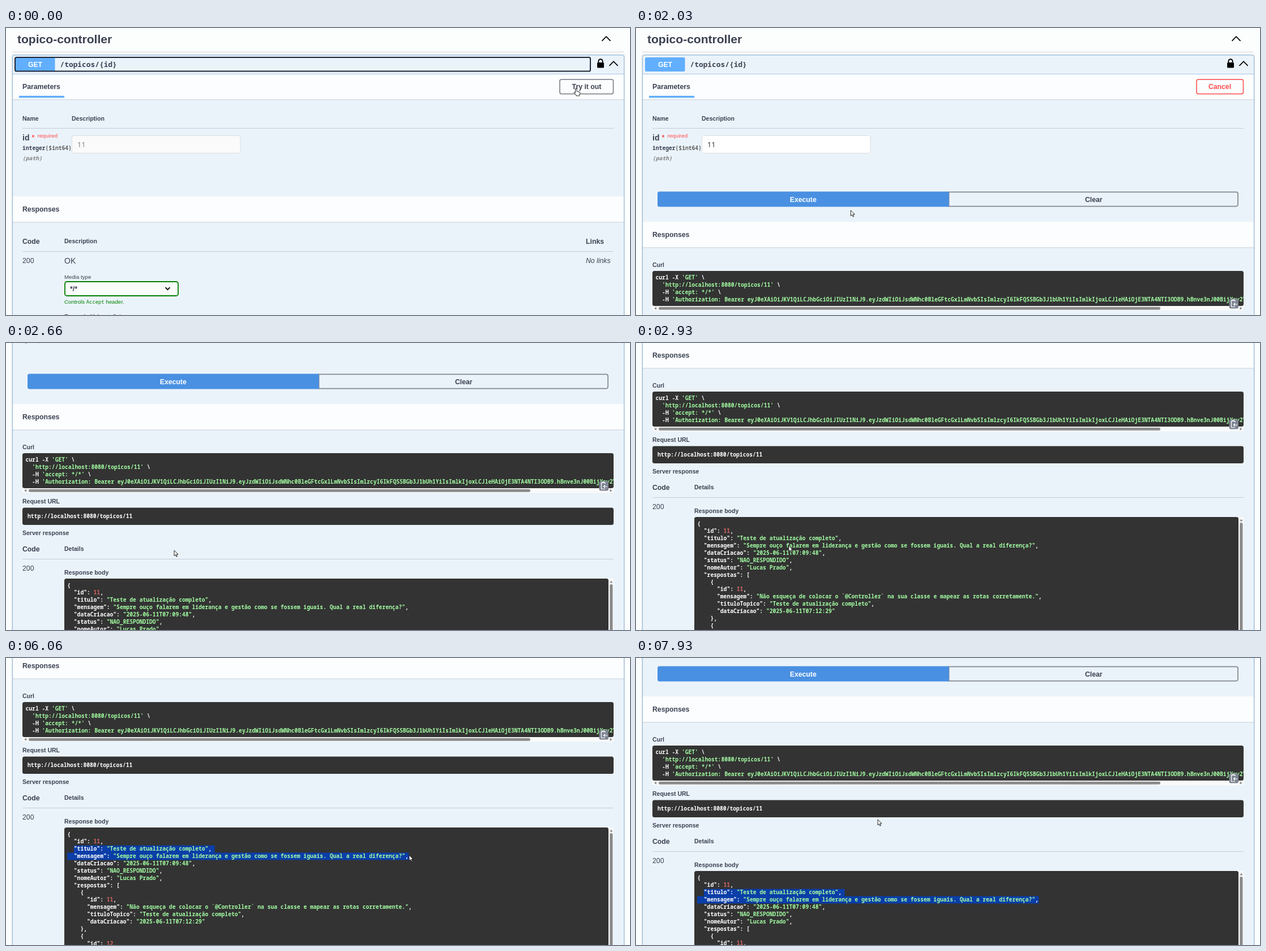
These frames come from a looping animation (1102x508 px, 8 s). An HTML page:

```html
<!DOCTYPE html>
<html lang="en">
<head>
<meta charset="utf-8">
<title>API explorer</title>
<style>
  html, body { margin: 0; width: 100%; height: 100%; overflow: hidden; background: #fcfdfd; }
  svg { display: block; }
  text { font-family: 'Liberation Sans', Arial, sans-serif; font-size: 12.28px; fill: #3b4151; }
  .b { font-weight: 700; }
  .i { font-style: italic; }
  .sm { font-size: 10.53px; }
  .xs { font-size: 9.7px; }
  .lg { font-size: 14.04px; }
  .title { font-size: 21.05px; }
  .mid { text-anchor: middle; }
  .mono { font-family: 'Noto Sans Mono', 'DejaVu Sans Mono', monospace; font-size: 9.66px; font-weight: 700; }
  .path { font-size: 12.87px; }
  .value { font-family: 'Open Sans', 'Noto Sans', sans-serif; font-size: 12.6px; }
  .w { fill: #fff; }
  .str { fill: #a2fca2; }
  .num { fill: #d36363; }
  .green { fill: #008000; }
  .red { fill: #ff4d4d; }
  .gray { fill: #808080; }
  .rule { fill: #c3ccd6; }
  .band { fill: #fbfdfe; }
  .dark { fill: #333; }
  .thumb { fill: #8b8b8b; }
  .outline { fill: none; stroke: #858990; stroke-width: 1.75; }
  .stroke { fill: none; stroke: #000; stroke-width: 1.8; }
</style>
</head>
<body>
<svg id="stage" width="1102" height="508" viewBox="0 0 1102 508"></svg>
<script>
const CHAR = 5.8, LINE = 12.87, LOOP = 8000;

const text = (x, y, s, cls = '') => `<text x="${x}" y="${y}" class="${cls}">${s}</text>`;
const rect = (x, y, w, h, cls = '', more = '') =>
  `<rect x="${x}" y="${y}" width="${w}" height="${h}" class="${cls}" ${more}/>`;
const rule = y => rect(29, y, 1044, 1, 'rule');
const band = (y, h) => rect(12, y + h, 1079, 1.5, '', 'fill="#d5dee6"') + rect(12, y, 1079, h, 'band');
const chevron = (x, y, w, h) => `<path class="stroke" d="M${x - w} ${y + h}L${x} ${y - h}L${x + w} ${y + h}"/>`;
const group = (id, body) => `<g id="${id}">${body}</g>`;

// Code block: indentation becomes an x offset, tokens become coloured spans
function code(x, y, lines, tint) {
  return lines.map((line, i) => {
    const body = line.trimStart();
    const indent = line.length - body.length;
    return text((x + indent * CHAR).toFixed(1), (y + i * LINE).toFixed(2), tint(body), 'mono w');
  }).join('');
}
const span = (cls, s) => `<tspan class="${cls}">${s}</tspan>`;
const tintShell = s => s.replace(/'[^']*'?/g, m => span('str', m));
const tintJson = s => s.replace(/"[^"]*":|"[^"]*"|\d+/g, m =>
  m.endsWith(':') ? m : span(m[0] === '"' ? 'str' : 'num', m));

const curl = [
  "curl -X 'GET' \\",
  "  'http://localhost:8080/topicos/11' \\",
  "  -H 'accept: */*' \\",
  "  -H 'Authorization: Bearer eyJ0eXAiOiJKV1QiLCJhbGciOiJIUzI1NiJ9.eyJzdWIiOiJsdWNhc0BleGFtcGxlLmNvbSIsImlzcyI6IkFQSSBGb3J1bUh1YiIsImlkIjoxLCJleHAiOjE3NTA4NTI3ODB9.hBnve3nJ00BijYpy2YkQ"
];
const json = [
  '{',
  '  "id": 11,',
  '  "titulo": "Teste de atualização completo",',
  '  "mensagem": "Sempre ouço falarem em liderança e gestão como se fossem iguais. Qual a real diferença?",',
  '  "dataCriacao": "2025-06-11T07:09:48",',
  '  "status": "NAO_RESPONDIDO",',
  '  "nomeAutor": "Lucas Prado",',
  '  "respostas": [',
  '    {',
  '      "id": 11,',
  '      "mensagem": "Não esqueça de colocar o `@Controller` na sua classe e mapear as rotas corretamente.",',
  '      "tituloTopico": "Teste de atualização completo",',
  '      "dataCriacao": "2025-06-11T07:12:29"',
  '    },',
  '    {',
  '      "id": 12,',
  '      "mensagem": "'
];

const header =
  text(20, 27, 'topico-controller', 'b title') + chevron(1060, 19, 7.5, 3.8) +
  rect(11, 42, 1080, 1, '', 'fill="#d3d6db"') +
  rect(11, 47.5, 1081, 2000, '', 'rx="3.5" fill="none" stroke="#000" stroke-opacity=".08" stroke-width="3"') +
  rect(11.5, 48, 1080, 2000, '', 'rx="3.5" fill="#ebf3fa" stroke="#8fb8de"') +
  rect(12, 81, 1079, 1, '', 'fill="#a6c9ea"') +
  rect(16, 52, 70.5, 25, '', 'rx="2.6" fill="#61affe"') +
  text(51.5, 68.5, 'GET', 'b mid w') + text(95.5, 69, '/topicos/{id}', 'mono path') +
  rect(1044, 61, 12, 9.5, '', 'rx="1.5"') +
  '<path d="M1046.4 62V58.8a3.6 3.6 0 0 1 7.2 0V62" fill="none" stroke="#000" stroke-width="1.9"/>' +
  chevron(1073, 63, 7.5, 3.8);

const params =
  band(82, 44) + text(29, 108, 'Parameters', 'b') + rect(23, 120, 80, 3.5, '', 'fill="#61affe"') +
  text(29, 163.5, 'Name', 'b sm') + text(116, 163.5, 'Description', 'b sm') + rule(177) +
  text(29, 199, 'id', 'b lg') + text(45.5, 198, '*', 'b red') + text(55.5, 194, 'required', 'xs red') +
  text(29, 216.3, 'integer<tspan fill="#606060">($int64)</tspan>', 'mono') +
  text(29, 234, '(path)', 'mono i gray') +
  '<rect id="field" x="116.5" y="190.5" width="297.5" height="31" rx="3.5" stroke="#d9dde1"/>' +
  '<text id="value" x="126" y="210.8" class="value">11</text>';

const defaults =
  text(29, 426.5, 'Code', 'b') + text(103, 426, 'Description', 'b sm') + text(1024, 426.5, 'Links', 'b') + rule(440) +
  text(29, 461, '200') + text(103, 462, 'OK', 'lg') + text(1024, 461, 'No links', 'i') +
  text(103, 488.7, 'Media type', 'xs') +
  rect(104, 494, 200, 25, '', 'rx="3.5" fill="#fbfcfc" stroke="#008000" stroke-width="1.8"') +
  text(113, 511, '*/*', 'b') +
  '<path class="stroke" d="M281.5 504.2L285.5 508.2L289.5 504.2"/>' +
  text(103, 532.5, 'Controls <tspan class="mono green" style="font-size:8.85px;font-weight:400">Accept</tspan> header.', 'xs green') +
  text(103, 559.5, 'Example Value', 'b sm') + rect(181.5, 551, 1, 12, 'rule') + text(188, 559.5, 'Schema', 'sm');

// Laid out as seen at full scroll, then pushed down the page
const result = `<g transform="translate(0 352)">` +
  text(29, 70.7, 'Curl', 'b sm') +
  rect(29, 136, 1044, 12, '', 'fill="#fafafa" rx="3.5"') + rect(29, 78, 1044, 62, 'dark', 'rx="3.5"') +
  rect(40, 141.7, 886, 5, 'thumb', 'rx="2.5"') +
  '<path class="thumb" d="M32 144.2l4-2.6v5.2zM1070.500 144.200l-4-2.600v5.200z"/>' +
  `<svg x="0" y="0" width="1073" height="400">${code(34.5, 93, curl, tintShell)}</svg>` +
  rect(1047.5, 127.500, 16.500, 17, '', 'rx="3" fill="#7d8492"') +
  '<path d="M1058 132v-1.500h-6.500v11h6.500M1053 130v-1h3.500v1M1062 137h-6M1058 134.500l-2.500 2.500l2.500 2.500" fill="none" stroke="#fff" stroke-width="1.200"/>' +
  text(29, 166.7, 'Request URL', 'b sm') + rect(29, 174.5, 1044, 30.5, 'dark', 'rx="3.5"') +
  text(38, 193.2, 'http://localhost:8080/topicos/11', 'mono w') +
  text(29, 223, 'Server response', 'b sm') +
  text(29, 251.7, 'Code', 'b') + text(103, 251, 'Details', 'b sm') + rule(265) +
  text(29, 286, '200') + text(103, 292.7, 'Response body', 'b sm') +
  rect(1060, 300, 13, 600, '', 'fill="#fafafa"') + rect(103, 300, 961, 600, 'dark', 'rx="3.5"') +
  '<path class="thumb" d="M1069 303.500l2.600 4h-5.200z"/>' + rect(1066.3, 310, 5.2, 500, 'thumb', 'rx="2.600"') +
  '<path id="selection" fill="#0b3ea8"/>' + code(108.2, 315.6, json, tintJson) + '</g>';

const cursors =
  group('arrow', '<path d="M0 0V9.800L2.300 7.700L3.900 11.300L5.500 10.600L3.900 7.100H7Z" fill="#fff" stroke="#111" stroke-width=".9"/>') +
  group('beam', '<path d="M-2-5h1.500l.5.600l.5-.600h1.500M0-4.500v9M-2 5h1.500l.5-.600l.5.600h1.500" fill="none" stroke="#ddd"/>') +
  group('hand', '<path d="M-.5 1a1.200 1.200 0 0 1 2.400 0v4l5 1.200q1 .4 .8 1.600l-.7 3.600v1.600H.8v-1.400l-3.600-4q-.4-1.200 1-1l1.300 1Z" fill="#fff" stroke="#111" stroke-width=".9"/>');

const stage = document.getElementById('stage');
stage.innerHTML =
  group('page',
    header + group('focus', rect(16, 52, 1016, 24.5, '', 'rx="2.600" fill="none" stroke="#1c2536" stroke-width="2"')) + params +
    group('tryIt', rect(978, 91, 94.500, 25.500, 'outline', 'rx="3"') + text(1025.500, 108, 'Try it out', 'b mid')) +
    group('cancel', rect(990, 91, 82.500, 25.500, 'outline', 'rx="3" style="stroke:#ff6060"') + text(1031, 108, 'Cancel', 'b mid red')) +
    group('actions', '<path id="clear" class="outline"/><path id="execute" fill="#4990e2"/>' +
      '<text id="executeText" class="b mid w">Execute</text><text id="clearText" class="b mid">Clear</text>') +
    group('lower', band(343, 45) + text(29, 369.500, 'Responses', 'b') + group('defaults', defaults) + group('result', result))) +
  group('cursor', cursors);

const el = Object.fromEntries([...stage.querySelectorAll('[id]')].map(n => [n.id, n]));
const set = (id, attrs) => Object.entries(attrs).forEach(([k, v]) => el[id].setAttribute(k, v));
const show = (id, on) => { el[id].style.display = on ? '' : 'none'; };
const shift = (id, x, y) => set(id, { transform: `translate(${x} ${y})` });

const bursts = [[420, 1210, 7], [1490, 2400, 8], [2540, 3050, 5], [3340, 4290, 8],
  [4420, 5370, 8], [5490, 6060, 5], [6460, 7420, 8], [7570, 7930, 4]];
function hold(t) {
  let last = 0;
  for (const [a, b, n] of bursts) {
    if (t < a) break;
    const k = Math.min(n - 1, Math.floor((t - a) / (b - a) * (n - 1) + 0.1));
    last = a + k * (b - a) / (n - 1);
  }
  return last;
}

// [time, x, y]
const pointer = [[0, 1006, 107], [560, 1006, 107], [1080, 470, 280], [1210, 440, 294], [1489, 440, 294],
  [1490, 440, 286], [1900, 400, 310], [2400, 306, 368], [2660, 297, 367], [2670, 297, 367],
  [3050, 256, 355], [3600, 210, 345], [4000, 155, 332], [4290, 140, 335], [4420, 135, 337],
  [4690, 121, 336], [4830, 150, 335], [4960, 205, 336], [5100, 255, 342], [5235, 275, 350],
  [5370, 285, 351], [5490, 310, 351], [6060, 712, 349], [6460, 703, 349], [7420, 404, 343], [7930, 427, 286]];
// [time, offset]
const scroll = [[0, 0], [2010, 0], [2140, 45], [2270, 100], [2400, 118], [2540, 188], [2660, 235], [2670, 235],
  [2795, 295], [2923, 344], [3050, 352], [7690, 352], [7810, 332], [7930, 275]];
function at(keys, t, i = 1) {
  const n = keys.findIndex(k => k[0] > t);
  if (n < 0) return keys[keys.length - 1][i];
  const a = keys[n - 1], b = keys[n];
  return a[i] + (b[i] - a[i]) * (t - a[0]) / (b[0] - a[0]);
}

// Button outline with optional rounded left and right ends
function bar(x, y, w, h, left, right) {
  const l = left ? 3.5 : 0, r = right ? 3.5 : 0;
  return `M${x + l} ${y}h${w - l - r}q${r} 0 ${r} ${r}v${h - 2 * r}q0 ${r} ${-r} ${r}` +
    `h${l + r - w}q${-l} 0 ${-l} ${-l}v${2 * l - h}q0 ${-l} ${l} ${-l}z`;
}

function drawActions(done, p) {
  const h = 31 - 4 * p, w = done ? 120 + 394.5 * p : 1026;
  const base = 290 + h / 2 + 4.2, rest = 1026 - w;
  set('execute', { d: bar(38, 289.5, w, h, true, !done) });
  set('executeText', { x: 38 + w / 2, y: base });
  show('clear', done);
  show('clearText', done);
  if (done) {
    set('clear', { d: bar(38 + w, 290.3, rest - 0.9, h - 1.7, false, true) });
    set('clearText', { x: 38 + w + rest / 2, y: base });
  }
}

function drawSelection(t, x, y) {
  let d = '';
  if (t >= 4690) {
    const end = t >= 6060 ? 711.4 : 108.2 + Math.round((x - 108.2) / CHAR) * CHAR;
    const two = t >= 6060 || y > 344.5;
    d = `M119.800 331.800H${two ? 368.5 : Math.max(119.8, end)}v12.900H119.800z`;
    if (two) d += `M108.200 344.600H${end}v12.900H108.200z`;
  }
  set('selection', { d });
}

function draw(now) {
  const t = hold(now);
  const open = t >= 420, done = t >= 1490;
  const u = Math.min(1, Math.max(0, (t - 1490) / 300));
  const p = u * u * (3 - 2 * u);
  const x = at(pointer, t, 1), y = at(pointer, t, 2);

  shift('page', 0, -Math.round(at(scroll, t)));
  shift('lower', 0, open ? 4 * (1 - p) : -45);
  show('focus', !open);
  show('tryIt', !open);
  show('cancel', open);
  show('actions', open);
  show('defaults', !done);
  show('result', done);
  set('field', { fill: open ? '#fff' : '#fafafa' });
  set('value', { fill: open ? '#222' : '#777', style: `fill:${open ? '#222' : '#777'}` });
  drawActions(done, p);
  drawSelection(t, x, y);

  const hand = t < 680 || (t >= 1200 && t < 1490);
  const beam = (t >= 2260 && t < 2600) || (t >= 3040 && t < 6050);
  shift('cursor', x.toFixed(1), y.toFixed(1));
  show('hand', hand);
  show('beam', beam);
  show('arrow', !hand && !beam);
}

const start = performance.now();
function tick() {
  draw((performance.now() - start) % LOOP);
  requestAnimationFrame(tick);
}
tick();
</script>
</body>
</html>
```
